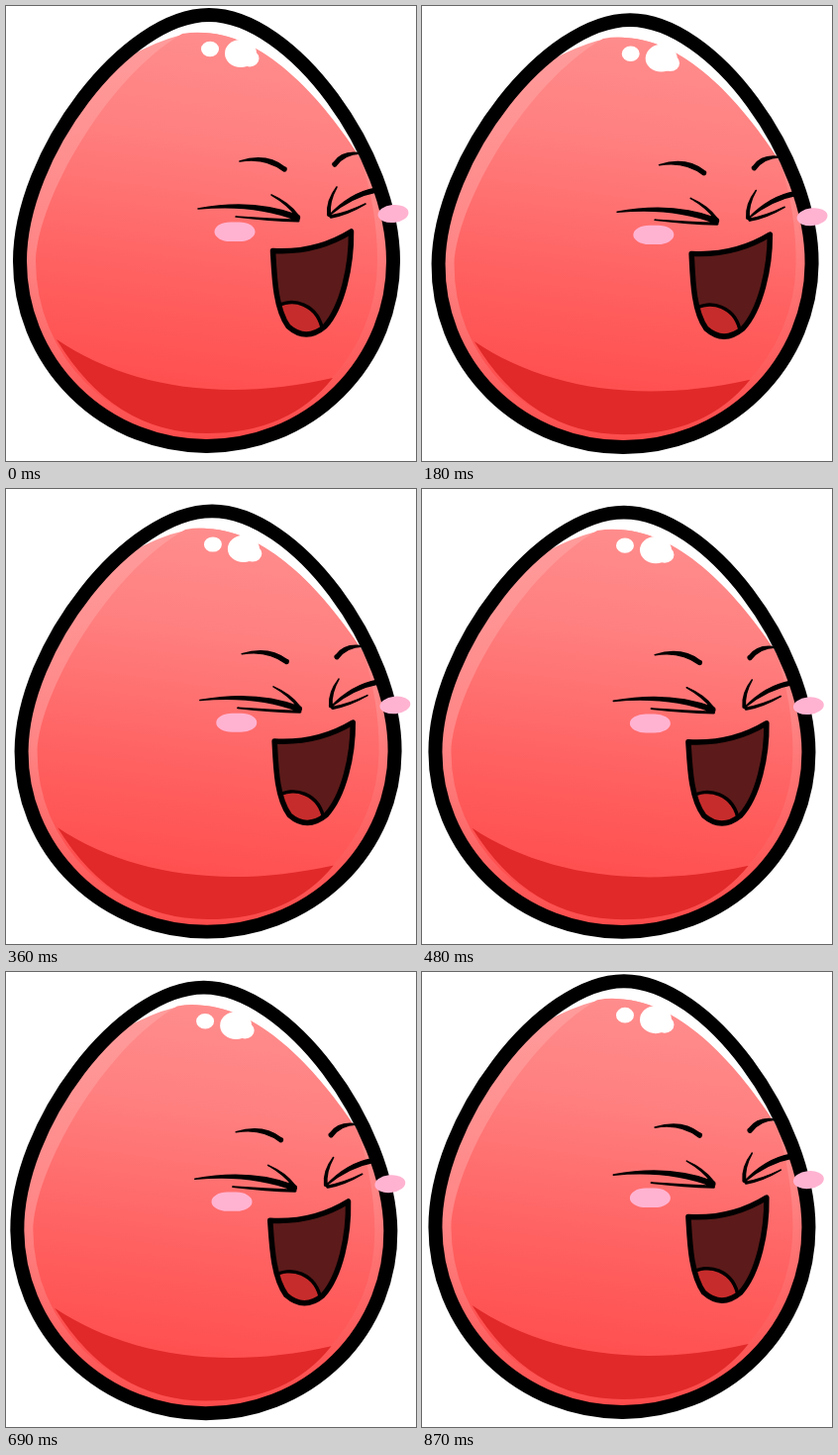
An HTML page that plays this animation: 414 by 460 pixels, repeating every 900 ms.

```html
<!DOCTYPE html>
<html lang="en">
<head>
<meta charset="utf-8">
<title>Laughing egg</title>
<style>
  html, body { margin: 0; width: 100%; height: 100%; overflow: hidden; background: #fff; }
  svg { display: block; width: 100%; height: 100%; }
</style>
</head>
<body>
<svg viewBox="0 0 414 460" preserveAspectRatio="none">
  <defs>
    <path id="shell" d="M14 258C14 150 121 9 205 9S391 150 391 258A188.500 187 0 0 1 14 258Z"/>
    <clipPath id="inside"><use href="#shell"/></clipPath>
    <linearGradient id="rim" gradientUnits="userSpaceOnUse" x1="180" y1="25" x2="215" y2="440">
      <stop offset="0" stop-color="#ff9c9c"/>
      <stop offset=".5" stop-color="#ff8585"/>
      <stop offset="1" stop-color="#fc4a4a"/>
    </linearGradient>
    <linearGradient id="body" gradientUnits="userSpaceOnUse" x1="225" y1="25" x2="175" y2="380">
      <stop offset="0" stop-color="#ff8d8d"/>
      <stop offset=".3" stop-color="#ff8080"/>
      <stop offset=".7" stop-color="#ff6262"/>
      <stop offset="1" stop-color="#ff5050"/>
    </linearGradient>
    <path id="mouth" d="M269.500 247.500Q313 250 348.500 228C349 262 340 304 322 324Q303 340 285 324C272 306 271 274 269.500 247.500Z"/>
    <clipPath id="lips"><use href="#mouth"/></clipPath>
  </defs>
  <g id="egg">
    <g clip-path="url(#inside)">
      <path fill="url(#rim)" d="M90 72Q160 25 200 27C265 30 322 98 366 166L400 260V450H0V200Z"/>
      <path fill="url(#body)" d="M30 258C32 195 102 72 178 28Q190 26 200 27C265 30 322 98 358 154Q375 205 375 258A172.500 174 0 0 1 30 258Z"/>
      <path fill="#e12929" d="M51 337C123 386 221 401 330 376Q286 432 203 432Q108 432 51 337Z"/>
    </g>
    <use href="#shell" fill="none" stroke="#000" stroke-width="14"/>
    <g fill="#fff">
      <ellipse cx="206" cy="43.500" rx="9" ry="7.800"/>
      <ellipse cx="237" cy="48" rx="16" ry="14"/>
      <ellipse cx="246" cy="53" rx="9.500" ry="8.500"/>
    </g>
    <g fill="#ffb3d1">
      <rect x="210.500" y="218.500" width="41" height="19.500" rx="16" ry="9.700"/>
      <ellipse cx="391" cy="210" rx="15.500" ry="9" transform="rotate(-6 391 210)"/>
    </g>
    <path id="ink" stroke="#000" stroke-width="1.600" stroke-linejoin="round"/>
    <use href="#mouth" fill="#5c1a1a"/>
    <path clip-path="url(#lips)" fill="#c72c2c" stroke="#000" stroke-width="3.500" d="M272 305C288 293 316 301 320 330L300 345L270 330Z"/>
    <use href="#mouth" fill="none" stroke="#000" stroke-width="5.500" stroke-linejoin="round"/>
  </g>
</svg>
<script>
  const LOOP = 900, STEP = 30;
  const egg = document.getElementById('egg');

  // Ink stroke from a fine point to a round end; bow bends it sideways
  function brush(x1, y1, x2, y2, bow, w) {
    const dx = x2 - x1, dy = y2 - y1, len = Math.hypot(dx, dy);
    const nx = dy / len, ny = -dx / len;
    const at = (x, y, d) => `${x + nx * d} ${y + ny * d}`;
    const mx = x1 + dx * 0.55, my = y1 + dy * 0.55;
    return `M${x1} ${y1}Q${at(mx, my, bow + w)} ${at(x2, y2, w)}` +
      `A${w} ${w} 0 0 1 ${at(x2, y2, -w)}Q${at(mx, my, bow - w)} ${x1} ${y1}Z`;
  }

  const brows = brush(236, 157, 281, 165, 11, 2) + brush(358, 149, 332, 160, -8, 2);
  const leftEye = brush(194, 205, 294, 214, 13, 2.4) + brush(232, 213, 295, 217, -1, 0.8) +
    brush(268, 191, 294, 212, 4, 1);
  const rightEye = brush(326, 212, 374, 186, 8, 2) + brush(334, 183, 326, 211, -5, 1.2) +
    brush(363, 200, 328, 213, 3, 0.9);
  document.getElementById('ink').setAttribute('d', brows + leftEye + rightEye);

  // Lean sideways from the base while squashing towards it
  function draw(ms) {
    const t = Math.floor(ms % LOOP / STEP) * STEP;
    const a = t / LOOP * 2 * Math.PI;
    const sway = Math.sin(a), squash = (1 - Math.cos(a)) / 2;
    egg.setAttribute('transform',
      `matrix(1 0 ${-0.0105 * sway} ${1 - 0.027 * squash} ${5.4 * sway} ${15 * squash})`);
  }

  let start;
  function tick(now) {
    start ??= now;
    draw(now - start);
    requestAnimationFrame(tick);
  }
  draw(0);
  requestAnimationFrame(tick);
</script>
</body>
</html>
```
